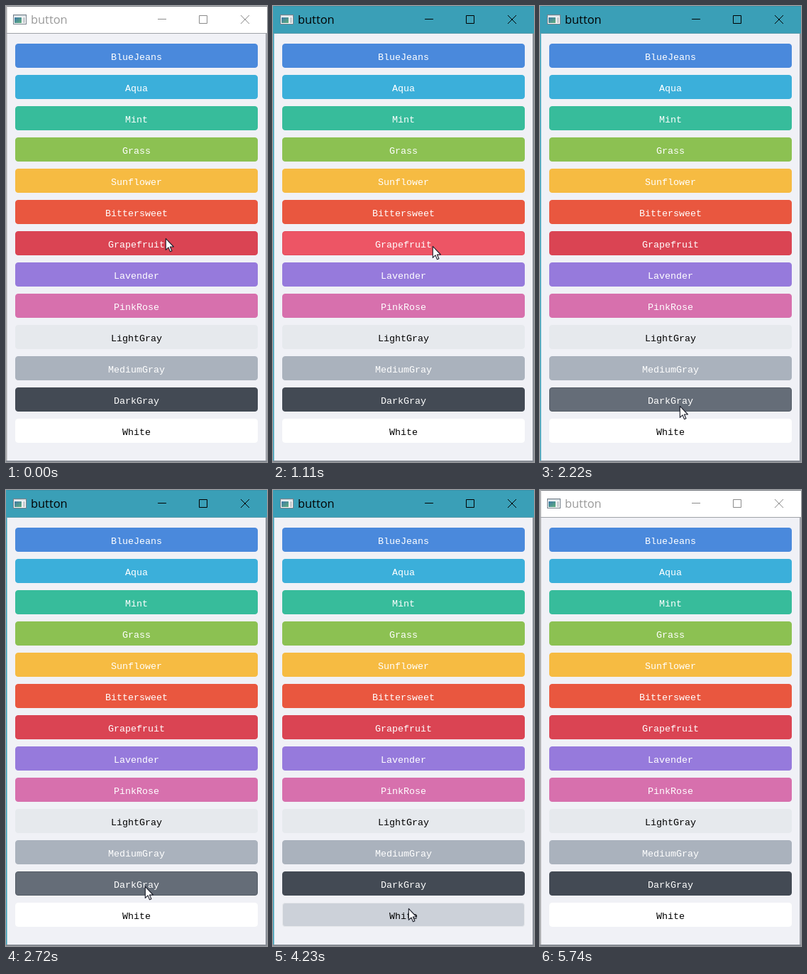
Animation, 368 px wide and 642 px high, one loop 5800 ms. Source, as an HTML page:

```html
<!DOCTYPE html>
<html lang="en">
<head>
<meta charset="utf-8">
<title>Flat buttons</title>
<style>
html, body { margin: 0; width: 100%; height: 100%; overflow: hidden; background: #f0f1f6; }
svg { display: block; width: 368px; height: 642px; }
.label { font: 13.33px "Liberation Mono", "Noto Sans Mono", monospace; text-anchor: middle; }
.title { font: 16.4px "Open Sans", "Noto Sans", sans-serif; }
#stage { --bar: #fff; --top: #777b80; --left: #a9aaac; --right: #a3a6ae; --rule: #9fa2a8; --ink: #999; --line: #8b8b8b; }
#stage.active { --bar: #3a9fb7; --top: #3793aa; --left: #3a9fb7; --right: #8a8f98; --rule: #5b9bab; --ink: #000; --line: #000; }
</style>
</head>
<body>
<svg id="stage" viewBox="0 0 368 642">
  <defs>
    <linearGradient id="tint" x2="1" y2="1">
      <stop stop-color="#3f78a8"/><stop offset="1" stop-color="#5fae7c"/>
    </linearGradient>
  </defs>
  <rect width="368" height="642" fill="#f0f1f6"/>
  <rect width="368" height="39" style="fill: var(--bar)"/>
  <rect width="368" height="1" style="fill: var(--top)"/>
  <rect width="1.5" height="642" style="fill: var(--left)"/>
  <rect x="366" y="38" width="2" height="604" style="fill: var(--right)"/>
  <rect y="640" width="368" height="2" fill="#858a92"/>
  <rect y="38" width="368" height="1" style="fill: var(--rule)"/>
  <g id="icon">
    <rect x="10.5" y="12.5" width="18" height="13" fill="#fff" stroke="#75808a"/>
    <rect x="11" y="13" width="17" height="2" fill="#d5dde2"/>
    <rect x="12" y="16" width="10" height="8" fill="url(#tint)"/>
    <rect x="23.5" y="16" width="3.5" height="8" fill="#c9ced2"/>
  </g>
  <text class="title" x="35" y="25" style="fill: var(--ink)">button</text>
  <path fill="none" style="stroke: var(--line)"
    d="M214 18.5h12M272.5 13.5h11v11h-11zM331 13l12 12M343 13l-12 12"/>
  <g id="buttons"></g>
  <path id="cursor" fill="#fff" stroke="#1c1f2b" stroke-width="1.1" stroke-linejoin="round"
    d="M.3 1.4V17.4L4 13.9 6.5 19.7 8.9 18.7 6.4 13H11.4Z"/>
</svg>
<script>
const LOOP = 5800, STEP = 60, EXIT = 5410;
const ROW = { x: 13, y: 53, w: 342, h: 34, pitch: 44 };

// label, fill, hover fill
const styles = [
  ["BlueJeans", "#4a89dc", "#5d9cec"],
  ["Aqua", "#3bafda", "#4fc1e9"],
  ["Mint", "#37bc9b", "#48cfad"],
  ["Grass", "#8cc152", "#a0d468"],
  ["Sunflower", "#f6bb42", "#ffce54"],
  ["Bittersweet", "#e9573f", "#fc6e51"],
  ["Grapefruit", "#da4453", "#ed5565"],
  ["Lavender", "#967adc", "#ac92ec"],
  ["PinkRose", "#d770ad", "#ec87c0"],
  ["LightGray", "#e6e9ed", "#e6e9ed"],
  ["MediumGray", "#aab2bd", "#ccd1d9"],
  ["DarkGray", "#434a54", "#656d78"],
  ["White", "#ffffff", "#ccd1d9"]
];
const darkText = ["LightGray", "White"];

// pointer strokes: start, end, x and y reached; it rests in between
const home = [225, 326];
const strokes = [
  [0, 360, 248, 18], [480, 620, 249, 73], [690, 1290, 219, 410],
  [1290, 1470, 203, 489], [1470, 1530, 203, 500], [1590, 1720, 202, 474],
  [1920, 2220, 197, 562], [2350, 2530, 196, 590], [2660, 2900, 196, 380],
  [2900, 3080, 195, 501], [3080, 3260, 195, 574], [3260, 3380, 191, 588],
  [4230, 4650, 194, 489], [4650, 4780, 195, 505], [5170, EXIT, 192, 650]
];
const presses = [[3570, 4230], [4840, 5230]];
const focus = [360, 5740];

const $ = id => document.getElementById(id);
const within = (t, [a, b]) => t >= a && t < b;
const ease = k => k * k * (3 - 2 * k);

function add(tag, attrs) {
  const el = document.createElementNS("http://www.w3.org/2000/svg", tag);
  for (const k in attrs) el.setAttribute(k, attrs[k]);
  return $("buttons").appendChild(el);
}

const faces = styles.map(([name], i) => {
  const y = ROW.y + i * ROW.pitch;
  const face = add("rect", { x: ROW.x + .5, y: y + .5, width: ROW.w - 1, height: ROW.h - 1, rx: 3.5 });
  const ink = darkText.includes(name) ? "#000" : "#fff";
  add("text", { class: "label", x: 184, y: y + 23, fill: ink }).textContent = name;
  return face;
});

// the pointer is redrawn once per step, not continuously
function pointerAt(t) {
  let [x, y] = home;
  for (const [start, end, toX, toY] of strokes) {
    if (t < start) break;
    const held = Math.floor((t - start) / STEP) * STEP;
    const k = t >= end ? 1 : ease(held / (end - start));
    x += (toX - x) * k;
    y += (toY - y) * k;
  }
  return [Math.round(x), Math.round(y)];
}

function render(t) {
  $("stage").classList.toggle("active", within(t, focus));

  const [x, y] = pointerAt(t);
  $("cursor").setAttribute("transform", `translate(${x} ${y})`);
  $("cursor").setAttribute("visibility", t < EXIT ? "visible" : "hidden");

  const live = within(t, [STEP, EXIT]) && !presses.some(p => within(t, p));
  faces.forEach((face, i) => {
    const [, base, hover] = styles[i];
    const dy = y - ROW.y - i * ROW.pitch;
    const fill = live && dy >= 0 && dy < ROW.h ? hover : base;
    face.style.fill = fill;
    face.style.stroke = `color-mix(in srgb, ${fill}, ${base})`;
  });
}

const begin = performance.now();
function tick() {
  render((performance.now() - begin) % LOOP);
  requestAnimationFrame(tick);
}
render(0);
requestAnimationFrame(tick);
</script>
</body>
</html>
```
